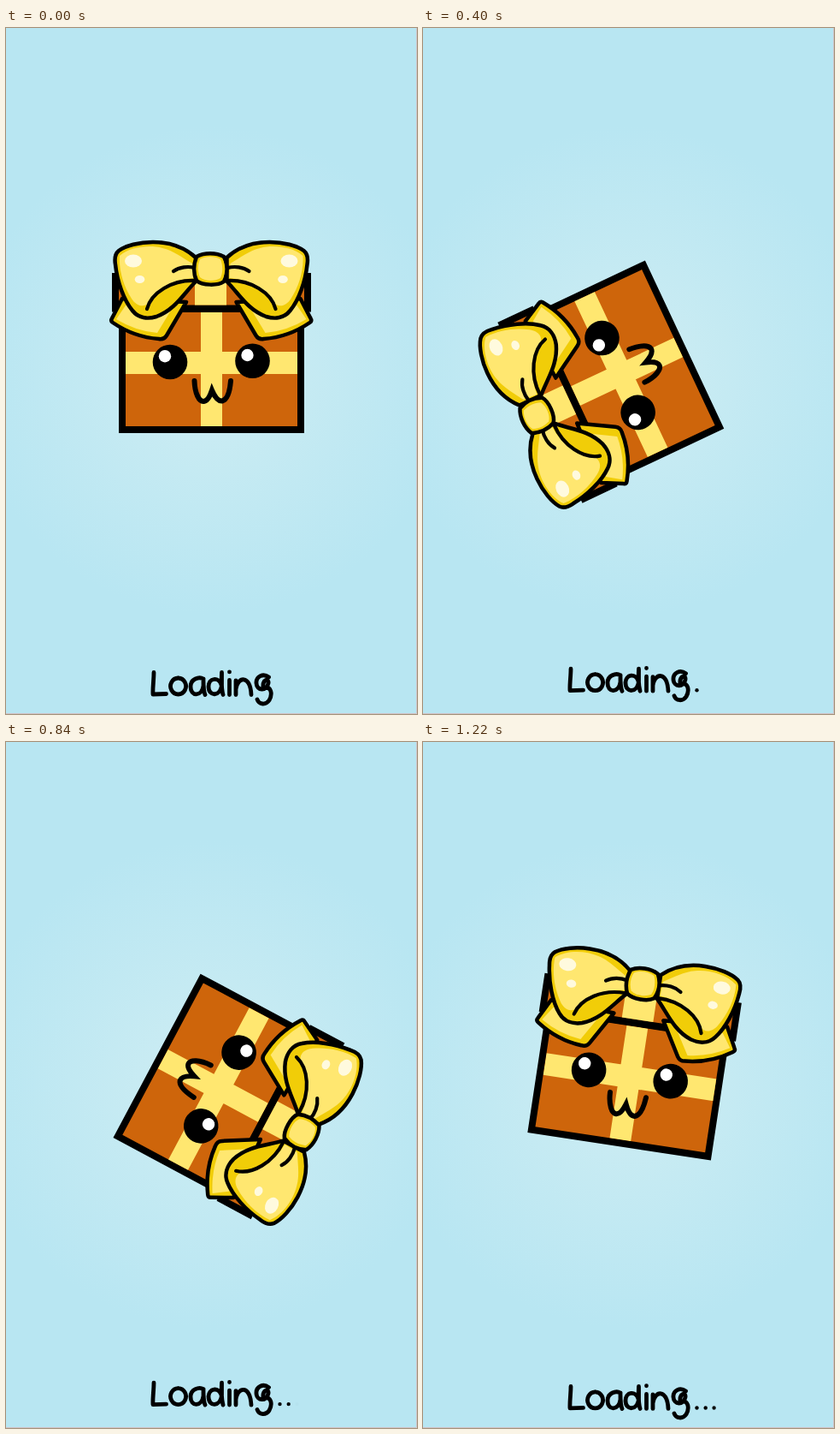
Recreate the animation shown at these times as an HTML page. Size 481 by 801 pixels, loop 1240 ms.

```html
<!DOCTYPE html>
<html lang="en">
<head>
<meta charset="utf-8">
<title>Loading</title>
<style>
  html, body { margin: 0; height: 100%; overflow: hidden; background: #b8e6f2; }
  svg { display: block; width: 100vw; height: 100vh; }
  .line { fill: none; stroke: #000; stroke-linecap: round; stroke-linejoin: round; }
  .ink { stroke: #000; stroke-width: 4.5; stroke-linejoin: round; }
  .box { fill: #ce650b; stroke: #000; stroke-width: 8; }
  .light { fill: #ffe770; }
  .dark { fill: #f1cd08; }
  .shine { fill: #fffade; }
</style>
</head>
<body>
<svg viewBox="0 0 481 801">
  <defs>
    <radialGradient id="glow" gradientUnits="userSpaceOnUse" cx="240" cy="400" r="285">
      <stop offset="0" stop-color="#ceedf3"/>
      <stop offset="1" stop-color="#b8e6f2"/>
    </radialGradient>
    <g id="eye">
      <circle r="20.3"/>
      <circle cx="-6" cy="-6.8" r="7.2" fill="#fff"/>
    </g>
    <g id="wing">
      <path class="ink dark" d="M136 316L124 339Q122 342 125 344Q150 361 179 363Q185 364 188 359L211 320Z"/>
      <path class="light" d="M140 324L129 340Q152 354 177 356L194 328Z"/>
      <path class="ink dark" d="M222 268C208 255 190 250 172 250C156 250 140 254 132 260C127 264 127 270 128 276C130 296 138 318 148 330C155 339 166 340 176 337C198 329 208 310 222 296Z"/>
      <path class="light" d="M133 266C146 255 168 253 183 257C196 260 206 268 218 275L219 292C196 294 178 303 168 320C161 328 152 324 147 316C138 302 132 284 133 266Z"/>
      <path class="line" stroke-width="4.2" d="M165 328C170 309 194 294 221 295M196 284C203 279 213 278 221 280"/>
      <ellipse class="shine" cx="149" cy="272" rx="10" ry="7.5"/>
      <ellipse class="shine" cx="156.5" cy="293.5" rx="5.8" ry="4.6"/>
    </g>
  </defs>

  <rect width="481" height="801" fill="url(#glow)"/>

  <g id="gift">
    <rect class="box" x="136" y="328" width="209" height="141"/>
    <path class="light" d="M228 332h25v133h-25zM140 378h205v26H140z" clip-path="inset(0 4px 0 0)"/>
    <use href="#eye" x="192" y="390"/>
    <use href="#eye" x="288.5" y="388.8"/>
    <path class="line" stroke-width="6" style="stroke-linejoin:miter" d="M220.5 412C221 427 226 436 231 436C236 436 239 429 241 423C244 430 248 436 253 435.5C259 434 262 424 263 412"/>
    <rect class="box" x="128" y="290" width="225" height="37.5"/>
    <path class="light" d="M221 294h37v29.5h-37z"/>
    <use href="#wing"/>
    <use href="#wing" transform="matrix(-1 0 0 1 480.5 0)"/>
    <path class="ink dark" d="M223 267C232 262 246 262 255 267C260 277 259 288 255 296C248 301 230 301 223 295C219 286 219 277 223 267Z"/>
    <path class="light" d="M227 270C234 266 244 266 251 270C254 278 254 285 251 292C244 296 233 296 227 291C224 284 224 277 227 270Z"/>
  </g>

  <g id="caption" role="img" aria-label="Loading">
    <path class="line" stroke-width="4.8" d="M173 752.5C173 762 171.5 770 172 778L187.500 777.500
      M201.500 759a9 9.500 0 1 0 .1 0
      M231 760C226 757 216 760 216 769C216 781 229 781 231 768V760C231 768 231 774 233 778.500
      M252 767C249 757 237 759 237 769C237 781 251 781 252.500 767V752.500C252 762 252 771 254 778.500
      M261.500 761.500V778.500M261.500 751.800v.1
      M269 778.500V762M269 772C271 757 286 755 287 778.500
      M307.500 758C301 753 292.500 757 293 765C293.500 774 305 775 307 765C308 759 300 760 301 770C311 768 312 778 308 785C304 791 296 790 294 784"/>
    <g id="dots">
      <circle cx="320.500" cy="777.500" r="2.200"/>
      <circle cx="330.700" cy="777.500" r="2.200"/>
      <circle cx="340.600" cy="777.500" r="2.200"/>
    </g>
  </g>

  <path d="M480.500 0V800.500H0" fill="none" stroke="#cfc3c8"/>
</svg>
<script>
  const LOOP = 1240, STEP = 20, TURN = 1250;
  const gift = document.getElementById('gift');
  const caption = document.getElementById('caption');
  const dots = [...document.getElementById('dots').children];

  function draw() {
    const t = Math.floor(performance.now() % LOOP / STEP) * STEP;
    const p = t / TURN;
    const lift = 3 * (Math.cos(2 * Math.PI * p) - 1);
    gift.setAttribute('transform', `rotate(${-360 * p} 240.5 400.5)`);
    caption.setAttribute('transform', `translate(0 ${lift})`);
    // Each dot fades in over its own third of the turn
    dots.forEach((dot, i) => dot.setAttribute('opacity', Math.min(1, Math.max(0, p * 3 - i))));
    requestAnimationFrame(draw);
  }
  draw();
</script>
</body>
</html>
```
